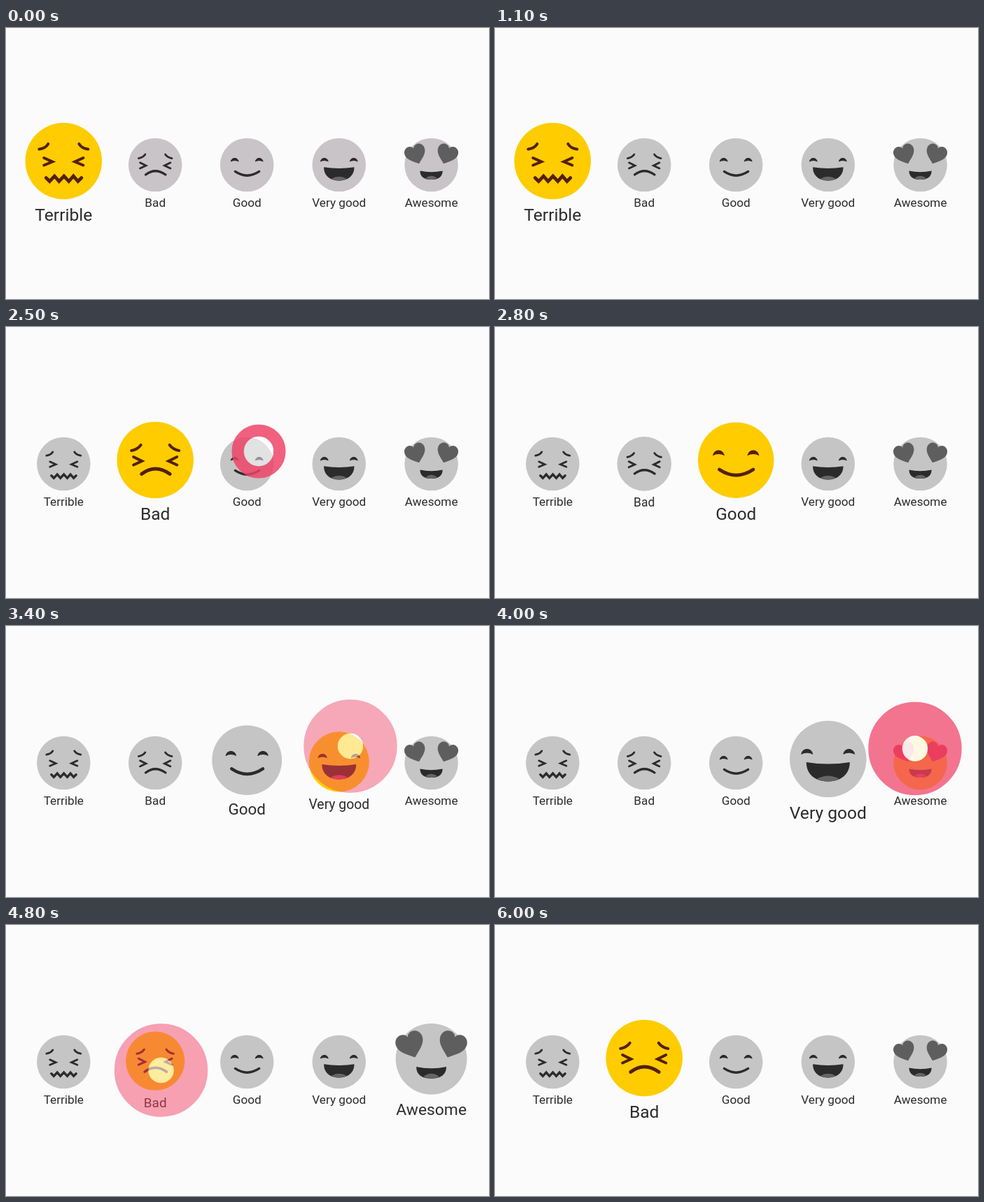
Write an HTML page that moves like this. It is 690 px wide and 388 px high and loops after 6700 ms.

```html
<!DOCTYPE html>
<html lang="en">
<head>
<meta charset="utf-8">
<title>Rating faces</title>
<style>
  html, body { margin: 0; width: 100%; height: 100%; overflow: hidden; background: #fbfbfb; }
  svg { display: block; width: 690px; height: 388px; }
  text { font: 17.2px Roboto, sans-serif; fill: #2d2b2d; text-anchor: middle; }
  .option { --skin: var(--grey); --ink: #2b2b2b; --tongue: #666; --heart: #5e5e5e; }
  .option.on { --skin: #fc0; --ink: #53200c; --tongue: #db3350; --heart: #dc2c46; }
  .skin { fill: var(--skin); }
  .line { fill: none; stroke: var(--ink); stroke-width: 4; stroke-linecap: round; }
  .thick { stroke-width: 4.8; }
  .ink { fill: var(--ink); }
  .tongue { fill: var(--tongue); }
  .heart { fill: var(--heart); }
  #ring { fill: none; stroke: rgb(240, 68, 104); }
  #core { fill: #fff; }
</style>
</head>
<body>
<svg viewBox="0 0 690 388">
  <g id="options"></g>
  <g id="ripple"><circle id="ring"/><circle id="core"/></g>
</svg>
<script>
const LOOP = 6700, STEP = 100;
const PIVOT_Y = 208.8, GROWTH = 0.43;

const path = (cls, d) => `<path class="${cls}" d="${d}"/>`;
const pair = part => part + `<g transform="scale(-1 1)">${part}</g>`;

const dome = x => pair(path('ink',
  `M${x - 8.5} -6.5C${x - 7} -17 ${x + 7} -17 ${x + 8.5} -6.5Q${x} -11 ${x - 8.5} -6.5Z`));

const laugh = (w, top, bottom, tw, ty) => {
  const mid = (top + bottom) / 2 + 4;
  return path('ink', `M${-w} ${top}Q0 ${top + 5} ${w} ${top}` +
      `C${w} ${mid} ${w * .58} ${bottom} 0 ${bottom}S${-w} ${mid} ${-w} ${top}Z`) +
    path('tongue', `M${-tw} ${ty}Q0 ${ty - 9} ${tw} ${ty}Q${tw * .55} ${bottom} 0 ${bottom}T${-tw} ${ty}Z`);
};

const heart = `<g transform="translate(-31.5 -20.5) rotate(-20) scale(1.07)">` +
  path('heart', 'M0 18C-8 11-20 4-20 -7C-20 -15-14 -19-9 -19C-4 -19-1 -16 0 -13' +
    'C1 -16 4 -19 9 -19C14 -19 20 -15 20 -7C20 4 8 11 0 18Z') + '</g>';

const faces = [
  ['Terrible', 82.3,
    pair(path('line', 'M-35 -17Q-26 -18-22 -24.5') + path('line', 'M-28 -4.5L-16 1L-28 6')) +
    path('line thick', 'M-25 24L-20 29L-13 21.5L-6.5 29L.5 21.5L7.5 29L14 21.5L20.5 29L25.5 24')],
  ['Bad', 213.2,
    pair(path('line', 'M-34 -13.5Q-25 -15-20.5 -21.5') + path('line', 'M-31 -4.5L-19 1.5L-31 7')) +
    path('line thick', 'M-19.5 20Q0 5 21 20')],
  ['Good', 344.2,
    dome(-25) + path('line thick', 'M-24 13.5Q0 30 25 13.5')],
  ['Very good', 475.8,
    dome(-30) + laugh(31, 4.5, 32, 16, 28.5)],
  ['Awesome', 607.6,
    pair(heart) + laugh(23, 12, 30, 12, 27)]
];

const taps = [
  { at: 1240, to: 1, x: 208, y: 217 },
  { at: 2475, to: 2, x: 361, y: 178 },
  { at: 3225, to: 3, x: 492, y: 172 },
  { at: 3925, to: 4, x: 600, y: 175.5 },
  { at: 4637, to: 1, x: 221.5, y: 208 }
];

const $ = id => document.getElementById(id);
$('options').innerHTML = faces.map(([label, , features]) =>
  `<g class="option"><g transform="translate(0 -12.8) scale(.7)">
    <circle class="skin" r="54.7"/>${features}</g><text y="47.2">${label}</text></g>`).join('');
const options = [...document.querySelectorAll('.option')];

const clamp = v => Math.max(0, Math.min(1, v));
const smooth = v => v * v * (3 - 2 * v);
const set = (el, attrs) => { for (const k in attrs) el.setAttribute(k, attrs[k]); };

function drawRipple(tap, age) {
  const visible = tap && age < 300;
  $('ripple').style.display = visible ? '' : 'none';
  if (!visible) return;
  const open = 1 - (1 - clamp(age / 60)) ** 1.6;
  const inner = 18.2 + 7 * (1 - open), outer = 66.7 * open;
  const fade = age / 300;
  set($('ripple'), { transform: `translate(${tap.x} ${tap.y})` });
  set($('ring'), {
    r: (outer + inner) / 2,
    'stroke-width': Math.max(0, outer - inner),
    opacity: 0.86 * (1 - fade ** 1.4)
  });
  set($('core'), { r: inner, opacity: clamp(age / 50) * (1 - fade ** 1.6) });
}

function draw(t) {
  const i = taps.findLastIndex(tap => tap.at <= t);
  const tap = taps[i];
  const age = tap ? t - tap.at : Infinity;
  const to = tap ? tap.to : 0;
  const from = i > 0 ? taps[i - 1].to : 0;
  const p = smooth(clamp((age - 75) / 280));
  const active = age >= 50 ? to : from;

  options.forEach((el, n) => {
    const size = 1 + GROWTH * (n === to ? p : n === from ? 1 - p : 0);
    set(el, { transform: `translate(${faces[n][1]} ${PIVOT_Y}) scale(${size})` });
    el.classList.toggle('on', n === active);
  });

  // The greys start slightly violet and settle to neutral.
  const tint = 1 - clamp(t / 700);
  const rb = 197 + 3 * tint, g = 197 - tint;
  $('options').style.setProperty('--grey', `rgb(${rb}, ${g}, ${rb})`);
  drawRipple(tap, age);
}

// The picture advances ten times a second; lead by one display refresh.
function tick() {
  const t = (performance.now() + 16) % LOOP;
  draw(Math.floor(t / STEP) * STEP);
  requestAnimationFrame(tick);
}
tick();
</script>
</body>
</html>
```
